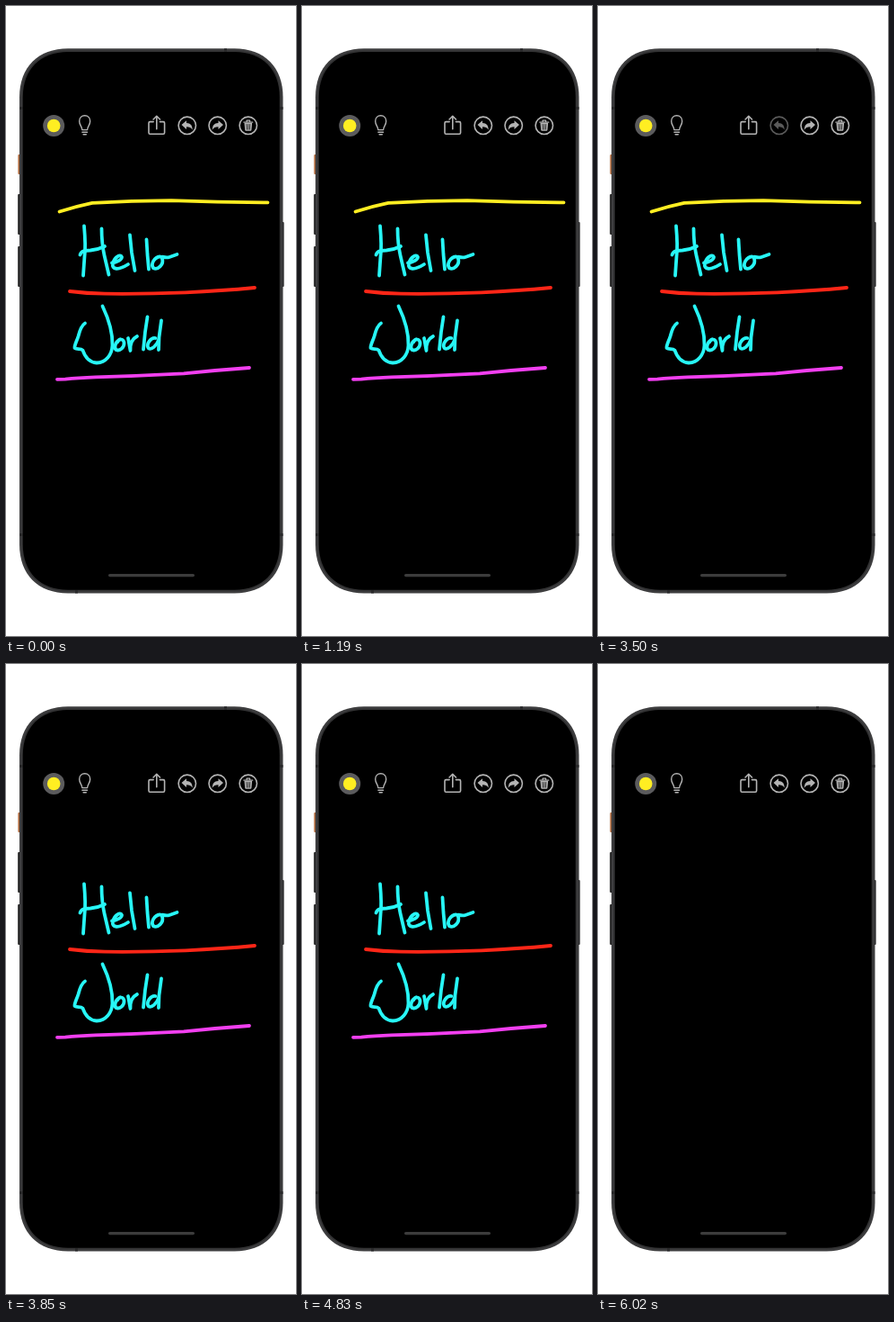
Write an HTML page with a canvas that moves like this. It is 323 px wide and 700 px high and loops after 6.15 s.

```html
<!DOCTYPE html>
<html lang="en">
<head>
<meta charset="utf-8">
<title>Sketch pad</title>
<style>
html, body { margin: 0; width: 100%; height: 100%; overflow: hidden; background: #fff; }
canvas { display: block; width: 323px; height: 700px; }
</style>
</head>
<body>
<canvas id="stage"></canvas>
<script>
const W = 323, H = 700, LOOP = 6150;
const canvas = document.getElementById('stage');
const ctx = canvas.getContext('2d');
const dpr = window.devicePixelRatio || 1;
canvas.width = W * dpr;
canvas.height = H * dpr;

const ICON = '#b4b4b4';
const CYAN = '#27f6f6';

const hello = [
  'M87 244.5 C88 256 89 267 87.5 278 L86 299.5',
  'M82.5 276.5 C84 272 88 271.5 94 271.5 C101 271 106 269 110 267',
  'M106.5 247.5 C106.5 258 107.5 268 109.5 277 L114.5 298.5',
  'M118 285.5 C123 285 129 282 129 279 C127.5 275 121 279 119 286 C117.5 293 125 294 136 287',
  'M138 254.5 L140 274 L143.5 294',
  'M156.5 259.5 L157.5 276 L159 292.5',
  'M171.5 278.5 C165 279 161 287 164 291 C169 294 176 287 174 281 C172 276 176 281 182 279 L190.5 276'
];
const world = [
  'M88 352.5 C84 355 82 361 80.5 367 C79 372 76 377 76.5 380 C79 382 83 380 85.5 382.5 C88 390 93 396 101 396.5 C111 396 118 388 118.5 377 C119 360 113 345 107.5 333.5',
  'M127 370.5 C122 373 120 379 122.5 382 C127 384 132 379 131.5 374 C131 370 126 369 124.5 373',
  'M136 369 L138.5 383 C138 376 140 370 146 367',
  'M157.5 345.5 L155 362 L153 381.5',
  'M166.5 369 C161 368 156 376 158.5 380 C162 383 168 377 170 371',
  'M173 349.5 L170.5 368 L170 382'
];
const yellowLine = ['M59.5 228.5 Q78 222.5 96 218.8 Q140 216.5 184 216.2 Q238 218.4 291.5 218.3'];
const redLine = ['M71 317 Q90 319.4 110 319.7 Q155 320.2 200 318.4 Q240 316.5 277 313'];
const pinkLine = ['M57 414.8 L66 414.6 Q80 413 100 412.3 Q150 411 198 408.4 Q235 404.5 271 402'];

// Button presses: start and release, followed by a short fade back.
const FADE = 70;
const presses = {
  undo: [[3430, 3570], [4060, 4200]],
  redo: [[4620, 4760], [5040, 5180]],
  trash: [[5880, 5950]]
};

const within = (t, a, b) => t >= a && t < b;

function alphaOf(name, t) {
  for (const [down, up] of presses[name]) {
    if (within(t, down, up)) return 0.5;
    if (within(t, up, up + FADE)) return 0.75;
  }
  return 1;
}

function stroke(d, color, width) {
  ctx.strokeStyle = color;
  ctx.lineWidth = width;
  ctx.stroke(new Path2D(d));
}

function fill(d, color) {
  ctx.fillStyle = color;
  ctx.fill(new Path2D(d));
}

function strokes(list, color, width = 3.8) {
  for (const d of list) stroke(d, color, width);
}

function disc(x, y, r, color) {
  ctx.fillStyle = color;
  ctx.beginPath();
  ctx.arc(x, y, r, 0, Math.PI * 2);
  ctx.fill();
}

function box(x, y, w, h, r, color) {
  ctx.fillStyle = color;
  ctx.beginPath();
  ctx.roundRect(x, y, w, h, r);
  ctx.fill();
}

// Rounded body with smooth, slightly elongated corners.
function shell(inset, color) {
  const l = 15 + inset, r = 308.5 - inset, t = 47.2 + inset, b = 652.5 - inset;
  const e = 54 - inset, k = e * 0.385;
  fill(`M${l + e} ${t} H${r - e} C${r - k} ${t} ${r} ${t + k} ${r} ${t + e}
    V${b - e} C${r} ${b - k} ${r - k} ${b} ${r - e} ${b}
    H${l + e} C${l + k} ${b} ${l} ${b - k} ${l} ${b - e}
    V${t + e} C${l} ${t + k} ${l + k} ${t} ${l + e} ${t} Z`, color);
}

function at(x, y, alpha, draw) {
  ctx.save();
  ctx.translate(x, y);
  ctx.globalAlpha = alpha;
  draw();
  ctx.restore();
}

function ring() {
  ctx.strokeStyle = ICON;
  ctx.lineWidth = 1.6;
  ctx.beginPath();
  ctx.arc(0, 0, 9.7, 0, Math.PI * 2);
  ctx.stroke();
}

function turnArrow() {
  ring();
  fill('M-6.3 -0.7 L-0.8 -5.5 V-2.8 C3.8 -2.8 5.8 0 5.9 4.9 C4.3 2.2 2.6 1.5 -0.8 1.5 V4.1 Z', ICON);
}

function drawPhone() {
  box(13.4, 165, 3, 22, 1, '#b06a3c');
  box(13.2, 209, 3, 45, 1, '#222');
  box(13.2, 267, 3, 45, 1, '#222');
  box(307, 240, 2.6, 72, 1, '#222');
  shell(0, '#39393a');
  shell(1.2, '#444446');
  shell(2, '#323233');
  for (const y of [112, 586]) {
    box(15, y, 4, 3, 0, '#29292a');
    box(304.5, y, 4, 3, 0, '#29292a');
  }
  box(243, 47.2, 3, 4, 0, '#29292a');
  box(77, 648.5, 3, 4, 0, '#29292a');
  shell(3.8, '#000');
  box(114, 631, 96, 3.2, 1.6, '#3c3c3c');
}

function drawToolbar(t) {
  disc(53.2, 133, 12, '#5b5b5d');
  disc(53.2, 133, 7.3, '#ffee22');

  at(87.7, 132, 1, () => {
    stroke('M-2.9 5.6 C-2.9 2 -6 0.6 -6 -4 C-6 -7.8 -3.4 -10.2 0 -10.2 C3.4 -10.2 6 -7.8 6 -4 C6 0.6 2.9 2 2.9 5.6 Z', ICON, 1.4);
    stroke('M-2.8 8.2 H2.8 M-1.6 10.8 H1.6', ICON, 1.4);
  });

  at(167.8, 132, 1, () => {
    stroke('M-3.6 -3.4 H-7.4 Q-8.8 -3.4 -8.8 -2 V8.8 Q-8.8 10.2 -7.4 10.2 H7.4 Q8.8 10.2 8.8 8.8 V-2 Q8.8 -3.4 7.4 -3.4 H3.6', ICON, 1.6);
    stroke('M0 4.8 V-9.6 M-3.7 -6 L0 -9.7 L3.7 -6', ICON, 1.6);
  });

  at(201.8, 132.8, alphaOf('undo', t), turnArrow);
  at(235.7, 132.8, alphaOf('redo', t), () => {
    ctx.scale(-1, 1);
    turnArrow();
  });
  at(269.8, 132.8, alphaOf('trash', t), () => {
    ring();
    stroke('M-5 -3.7 H5 M-1.8 -4 V-5.6 H1.8 V-4', ICON, 1.2);
    fill('M-4.3 -2.8 H4.3 L3.6 5 Q3.5 6 2.5 6 H-2.5 Q-3.5 6 -3.6 5 Z', ICON);
    stroke('M-1.9 -1.3 L-1.6 4.3 M0 -1.3 V4.3 M1.9 -1.3 L1.6 4.3', '#000', 0.7);
  });
}

function drawSketch(t) {
  if (t >= presses.trash[0][1]) return;
  const [undoYellow, undoPink] = presses.undo;
  const [redoPink, redoYellow] = presses.redo;
  strokes(hello, CYAN);
  strokes(world, CYAN);
  strokes(redLine, '#ff2617');
  if (!within(t, undoPink[1], redoPink[1])) strokes(pinkLine, '#f23ff0');
  if (!within(t, undoYellow[1], redoYellow[1])) strokes(yellowLine, '#ffee22');
}

function render(t) {
  ctx.setTransform(dpr, 0, 0, dpr, 0, 0);
  ctx.lineCap = ctx.lineJoin = 'round';
  ctx.fillStyle = '#fff';
  ctx.fillRect(0, 0, W, H);
  drawPhone();
  drawToolbar(t);
  drawSketch(t);
}

const start = performance.now();
function tick() {
  render((performance.now() - start) % LOOP);
  requestAnimationFrame(tick);
}
tick();
</script>
</body>
</html>
```
